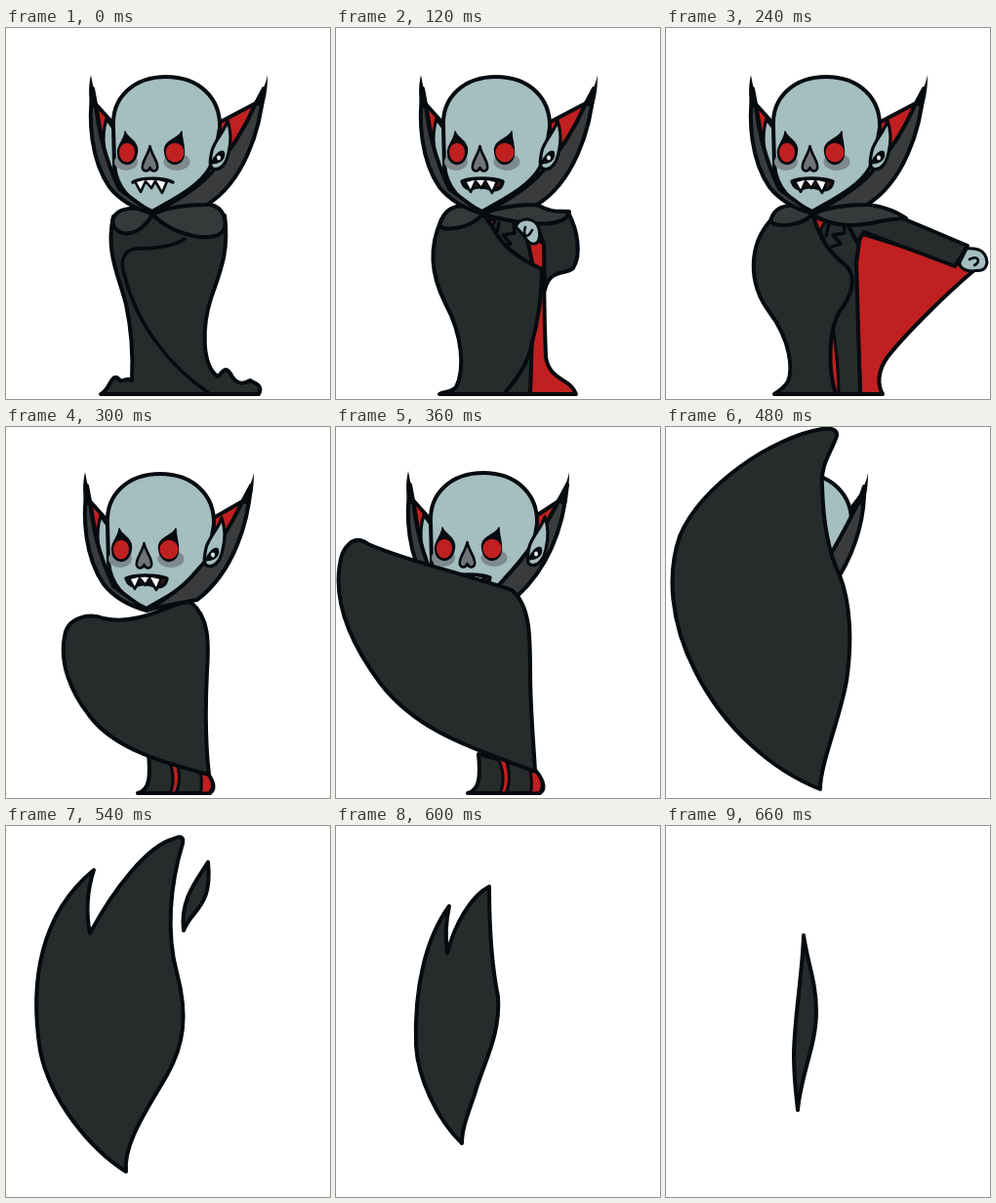
Recreate the animation shown at these times as an HTML page. Size 332x380 px, loop 720 ms.

```html
<!DOCTYPE html>
<html lang="en">
<head>
<meta charset="utf-8">
<title>Vampire</title>
<style>
html, body { margin: 0; width: 100%; height: 100%; overflow: hidden; background: #fff; }
svg { display: block; width: 332px; height: 380px; }
path, ellipse { stroke-linejoin: round; stroke-linecap: round; }
</style>
</head>
<body>
<svg id="stage" viewBox="0 0 332 380"></svg>
<script>
const STEP = 60, LOOP = 720;
const INK = '#050b0f', CLOTH = '#262b2b', FLAP = '#343939', GREY = '#393b3c', RED = '#c02020', SKIN = '#a5bec0';
const stage = document.getElementById('stage');

const shape = (d, fill = CLOTH, w = 4) =>
  `<path d="${d}" fill="${fill}" stroke="${INK}" stroke-width="${w}"/>`;
const line = (d, w = 3.4) => shape(d, 'none', w);
const oval = (x, y, rx, ry, fill) =>
  `<ellipse cx="${x}" cy="${y}" rx="${rx}" ry="${ry}" fill="${fill}"/>`;

// Blend two paths that share the same commands
function mix(a, b, k) {
  const to = b.match(/-?[\d.]+/g);
  let i = 0;
  return a.replace(/-?[\d.]+/g, n => +(+n + (to[i++] - n) * k).toFixed(2));
}
const along = (list, p) => {
  const i = Math.min(Math.floor(p), list.length - 2);
  return mix(list[i], list[i + 1], p - i);
};

const band = [
  'M264 62 C261 105 243 158 206 181 C190 181 170 182 150 190 C185 172 203 158 213 145 C232 124 246 100 256 77 Z',
  'M250 62 C247 95 236 142 198 177 C185 182 165 188 150 190 C170 175 178 168 186 158 C205 138 225 110 241 79 Z',
  'M232 64 C233 92 225 125 207 155 C200 165 190 175 180 180 C185 165 192 145 198 133 C208 115 220 95 229 73 Z'
];
const lining = [
  'M218 97 L256 77 C246 100 236 118 222 132 Z',
  'M218 94 L241 79 C232 98 225 112 215 122 Z',
  'M219 86 L229 73 C226 85 220 95 214 105 Z'
];

function mouth(open) {
  const y = 158 + open * 7;
  const lips = `M129 157 C138 153 160 153 171 157 C170 ${y} 164 ${y + 2} 158 ${y} C150 ${y - 3} 145 ${y - 3} 138 ${y} C132 ${y} 130 160 129 157 Z`;
  return (open ? shape(lips, '#3a1719', 3.4) : line('M130 158 C138 153 162 153 171 158')) +
    shape('M132 157 L138 168 L143 157 L149 164 L153 157 L160 169 L165 157 C155 154 142 154 132 157 Z', '#fff', 2.6);
}

function eye(x, tip, lid, rx) {
  const at = n => x + lid * n;
  return oval(at(0) + (lid < 0 ? 2 : -1), 137, rx + 2, 9, '#7e8a8e') +
    shape(`M${tip} 106 C${tip + lid * 2} 113 ${at(10)} 115 ${at(10.5)} 124 C${at(10.5)} 144 ${at(-9.5)} 144 ${at(-9.5)} 127 C${at(-9.5)} 119 ${tip} 114 ${tip} 106 Z`, INK, 1.5) +
    oval(x, 127.5, rx - 2, 9.8, RED);
}

const rightEar =
  shape('M227 95 C224 106 213 116 211 126 C209 135 208 142 212 144 C220 147 226 138 228 128 C231 116 231 106 227 95 Z', SKIN, 3.2) +
  shape('M210 139 C214 130 220 124 223 127 C225 132 221 137 216 138 Z', INK, 1.5) +
  oval(218, 133, 2, 2.4, '#dfe8e8');

function head(x, y, turn, open) {
  const bare = turn < 1.2;
  return `<g transform="translate(${x} ${y})">` +
    (bare ? shape('M92 78 L110 98 L110 150 L100 125 Z', RED) : '') +
    shape(along(lining, turn), RED) +
    (bare ? shape('M103 93 C97 112 100 135 111 151 L111 104 Z', SKIN, 3.2) : '') +
    shape('M110 102 C108 70 132 50 164 50 C198 50 220 72 219 102 C216 122 214 130 209 143 C198 163 170 176 150 188 C128 178 113 165 111 140 Z', SKIN) +
    eye(124, 122, 1, 10) + eye(173, 180, -1, 11.5) +
    shape('M147.5 121 C146 130 138 138 140 144 C142 148 146 147 147.5 143 C149 147 153 148 155 144 C157 138 149 130 147.5 121 Z', '#717476', 2.6) +
    mouth(open) +
    (bare ? shape('M89 62 C84 95 87 135 106 163 C118 178 135 186 150 190 L116 165 C100 130 95 105 92 78 Z', GREY) +
      shape('M87 48 C84 62 85 72 87 82 L94 82 C92 70 89 60 87 48 Z', INK, 0) : '') +
    shape(along(band, turn), GREY) +
    `<g transform="translate(${-16 * turn} ${turn})">` +
    shape('M268 48 C266 60 259 71 254 78 L263 82 C267 70 268 60 268 48 Z', INK, 0) + '</g>' +
    (bare ? rightEar : '') + '</g>';
}

const closed = {
  body: 'M110 193 C102 230 115 252 123 283 C130 315 130 340 129 361 C125 357 119 363 117 361 C108 350 107 371 97 375 L259 375 C264 366 255 364 250 361 C240 367 234 362 230 354 C224 345 221 354 217 357 C200 345 201 305 210 277 C219 250 229 230 224 192 L150 190 Z',
  fold: 'M183 216 C170 225 150 226 133 226 C118 228 117 242 122 255 C133 300 165 345 208 374',
  left: 'M150 191 C135 181 112 183 109 198 C112 216 137 215 150 191 Z',
  right: 'M150 191 C175 180 198 176 210 181 C222 184 226 195 224 205 C218 221 176 216 150 191 Z'
};
const peek = {
  body: 'M108 196 C95 225 97 252 112 282 C130 315 132 350 123 368 C121 371 118 372 115 372 C111 372 108 373 106 375 L246 375 C246 371 240 366 235 364 C228 362 222 360 218 353 C214 345 213 335 213 320 C213 300 213 285 214 268 C219 247 258 264 239 191 L150 190 Z',
  fold: 'M160 203 C168 224 180 234 200 241 C211 245 212 250 211 260 C213 305 206 345 198 374',
  left: 'M150 191 C135 178 112 178 106 203 C113 208 137 206 150 191 Z',
  right: 'M150 191 C178 178 198 179 208 182 C222 190 230 187 239 188 C236 203 205 205 150 191 Z',
  lining: 'M195 214 L214 220 C213 250 213 290 215 337 C219 362 240 358 246 375 L199 375 C199 350 200 340 200 320 Z',
  torso: 'M150 190 L205 195 L196 216 L203 250 L199 375 L165 375 L150 260 Z',
  sleeve: 'M200 188 L239 191 C247 207 252 231 243 246 C236 253 219 246 214 268 L213 222 L205 200 Z',
  hand: 'M184 204 C188 192 205 194 208 206 C210 215 207 222 202 221 C196 222 192 209 184 204 Z',
  finger: 'M194 204 C191 213 196 217 201 207',
  cape: 'M108 196 C95 225 97 252 112 282 C130 315 132 350 123 368 C117 374 110 372 106 375 L172 375 C183 362 197 345 201 322 C207 300 211 275 211 247 C188 236 170 225 160 203 L150 190 Z'
};
const wide = {
  left: 'M150 191 C135 178 112 178 107 198 C113 204 137 204 150 191 Z',
  right: 'M150 191 C178 175 220 177 246 195 C235 196 225 196 215 199 C195 204 170 204 150 191 Z',
  lining: 'M199 210 L317 247 C285 274 245 314 227 337 C216 352 217 366 222 375 L199 375 C198 340 195 300 195 240 Z',
  torso: 'M150 190 L215 195 L199 211 L195 240 L199 375 L165 375 L150 260 Z',
  sleeve: 'M180 190 L235 192 C260 202 285 213 309 223 C305 230 300 238 296 244 L203 209 L196 220 Z',
  hand: 'M308 226 C316 225 328 226 329 240 C327 252 318 247 314 249 C305 249 300 244 301 240 Z',
  finger: 'M311 237 C320 232 323 240 316 243',
  cape: 'M108 196 C84 222 84 262 106 291 C128 320 130 350 125 362 C120 370 112 374 111 375 L174 375 C166 350 166 310 178 290 C190 275 196 256 185 244 C165 228 158 215 152 196 L150 190 Z'
};

function wrapped(k) {
  const part = n => mix(closed[n], peek[n], k);
  return shape(part('body')) + line(part('fold')) + shape(part('left'), FLAP) +
    shape(part('right'), FLAP) + head(0, 0, 0, k);
}

function opening(k) {
  const part = n => mix(peek[n], wide[n], k);
  return shape(part('lining'), RED) + shape(part('torso')) + shape(part('sleeve')) +
    shape('M151 194 L163 198 L158 207 L163 220 L155 206 Z', RED, 2.6) +
    line('M182 200 L183 210 L171 212 L179 221 L170 224 M167 200 L164 213') +
    (k > .7 ? shape('M171 305 C166 330 167 355 172 375 L177 375 C177 345 174 330 171 305 Z', RED, 3) : '') +
    shape(part('cape')) + shape(part('left'), FLAP) + shape(part('right'), FLAP) +
    shape(part('hand'), SKIN, 3) + line(part('finger'), 2.6) + head(0, 0, 0, 1);
}

const legs = shape('M146 335 C148 355 148 372 135 375 L209 375 C217 370 210 358 203 350 Z') +
  shape('M165 338 C172 350 173 365 168 375 L174 375 C179 365 178 352 174 340 Z', RED, 3) +
  shape('M199 350 C200 360 202 368 199 375 L208 375 C215 368 210 358 204 352 Z', RED, 3);

const sweep = (x, y, turn, cape, under = '') => head(x, y, turn, 1) + under + shape(cape);

const poses = [
  wrapped(0), wrapped(.5), opening(0), opening(.5), opening(1),
  sweep(-6, -2, .5, 'M60 215 C62 195 85 190 100 196 C140 205 175 175 190 180 C208 195 208 220 206 250 C204 290 205 330 208 356 C165 345 110 330 85 295 C65 270 55 240 60 215 Z', legs),
  sweep(-13, -3, 1, 'M4 140 C6 125 17 108 33 120 C75 138 130 150 180 167 C199 182 199 215 199 250 C199 290 203 330 204 353 C150 332 85 315 45 262 C10 215 -2 175 4 140 Z', legs),
  sweep(-21, -3, 1.5, 'M20 110 C35 80 70 40 95 48 C110 75 135 130 178 160 C198 182 199 215 196 255 C192 300 180 340 180 365 C130 345 75 320 38 260 C8 210 5 150 20 110 Z'),
  sweep(-29, -3, 2, 'M175 9 C170 25 158 38 160 60 C161 100 167 130 178 152 C189 180 191 220 185 260 C178 300 158 345 158 371 C110 352 60 310 30 250 C4 200 1 150 14 112 C35 60 110 10 160 2 Q176 0 175 9 Z'),
  shape('M90 45 C82 70 82 90 86 110 C110 65 145 20 172 13 Q183 8 181 18 C168 60 164 110 175 150 C187 195 182 225 165 255 C145 290 120 325 123 354 C85 330 45 280 35 230 C24 160 35 90 90 45 Z') +
    shape('M207 37 C196 55 178 75 182 107 C190 85 212 84 207 37 Z'),
  shape('M116 82 C112 100 112 115 114 130 C122 100 138 72 157 62 C157 100 159 140 166 175 C169 215 150 245 142 275 C133 300 129 312 129 325 C103 300 84 258 82 225 C80 165 92 115 116 82 Z'),
  shape('M141 112 C140 150 131 200 131 235 C131 260 134 280 135 291 C138 255 154 225 154 190 C154 160 145 140 141 112 Z')
];

let shown = -1;
function draw(now) {
  const i = Math.floor((now % LOOP) / STEP);
  if (i !== shown) stage.innerHTML = poses[shown = i];
}

const start = performance.now();
function tick() {
  draw(performance.now() - start);
  requestAnimationFrame(tick);
}
tick();
</script>
</body>
</html>
```
